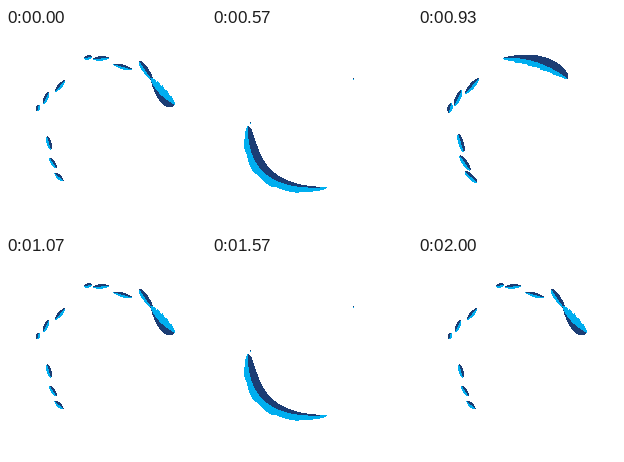
These frames come from a looping animation (200x200 px, 2070 ms). An HTML page:

```html
<!DOCTYPE html>
<html>
<head>
<meta charset="utf-8">
<style>
  html, body { margin: 0; width: 100%; height: 100%; overflow: hidden; background: #fff; }
  svg { display: block; width: 100vw; height: 100vh; shape-rendering: crispEdges; }
</style>
</head>
<body>
<svg id="stage" viewBox="0 0 200 200"></svg>
<script>
const DARK = '#1c3d74', LIGHT = '#00aeef';
const CENTER = [100, 98], STEPS = 40;

// Point and outward normal at u on a quadratic curve through tail, mid and head.
function along([tail, mid, head], u) {
  const v = 1 - u, point = [], slope = [];
  for (const i of [0, 1]) {
    const control = 2 * mid[i] - (tail[i] + head[i]) / 2;
    point[i] = v * v * tail[i] + 2 * u * v * control + u * u * head[i];
    slope[i] = v * (control - tail[i]) + u * (head[i] - control);
  }
  let [nx, ny] = [slope[1], -slope[0]];
  const outward = nx * (point[0] - CENTER[0]) + ny * (point[1] - CENTER[1]);
  const scale = Math.sign(outward) / Math.hypot(nx, ny);
  return { point, normal: [nx * scale, ny * scale] };
}

// One side of a stroke; bias moves the widest part to the head, rag notches the edge.
function side(spine, width, color, bias, rag) {
  const inner = [], edge = [];
  for (let i = 0; i <= STEPS; i++) {
    const u = i / STEPS, { point, normal } = along(spine, u);
    const swell = Math.sqrt(Math.max(0, Math.sin(Math.PI * u ** bias)));
    const w = width * swell * (1 - rag * (u * 5 % 1));
    inner.push(point);
    edge.unshift(point.map((p, k) => p + normal[k] * w));
  }
  return `<polygon points="${[...inner, ...edge].join(' ')}" fill="${color}"/>`;
}

// Positive widths grow away from the centre, negative ones towards it.
const brush = (spine, dark, light, bias = 1, rag = .25) =>
  side(spine, light, LIGHT, 1, rag) + side(spine, dark, DARK, bias, 0);

// Short strokes lying along the ring; the navy side flips in the lower half.
const dashes = (marks, width, stretch = 1) => marks.map(([x, y, length = 4]) => {
  const dx = x - CENTER[0], dy = y - CENTER[1];
  const k = length * stretch / 2 / Math.hypot(dx, dy);
  const w = y > CENTER[1] ? -width : width;
  const spine = [-k, 0, k].map(s => [x - dy * s, y + dx * s]);
  return brush(spine, w, -w, 1, 0);
}).join('');

const marks = [
  [53, 149, 12], [47, 135, 13], [43, 115, 14], [32, 80, 7], [40, 70, 13],
  [54, 58, 15], [82, 29.5, 8], [95, 30.5, 16], [117, 39, 20]
];
const ringDots = [
  [46, 141], [41.5, 124], [38.5, 101], [35.5, 72], [47, 59],
  [64, 48], [91, 28], [110, 31.5], [134, 47]
];
const rightDots = [[150, 46.5], [152, 53.5], [153.5, 61.5]];

const poses = {
  right: dashes(marks, 2.3) +
    brush([[133, 33], [139, 42], [147, 53]], 3.5, -3) +
    brush([[144, 50], [153, 65], [169, 77]], -6, 8, 3),
  rightLow: dashes(ringDots, 1.8, 2) +
    brush([[146, 48], [162, 78], [166, 116]], -8, 8, 2),
  bottomRight: dashes([...ringDots, ...rightDots], 1.6) +
    brush([[160, 106], [157, 128], [151, 149]], -8, 8, 3),
  bottom: dashes(ringDots, 1, .5) +
    brush([[152, 134], [118, 159], [63, 151]], -8, 8, 2),
  left: dashes([[141.5, 51], [38.5, 95]], .7, .4) +
    brush([[116, 159], [55, 147], [36, 97]], -8, 8, 2),
  top: brush([[42, 61], [65, 42], [106, 33]], 8, -7, 2) +
    brush([[49, 62], [36, 93], [37, 131]], 8, -7) +
    brush([[46, 124], [58, 149], [81, 168]], -5, 6),
  topRight: dashes(marks.slice(0, 6), 2.8, 1.4) +
    brush([[84, 30], [118, 34], [150, 51]], 8, -6, 2)
};

const LOOP = 2070, TURN = 1000;
const cycle = [[140, 'rightLow'], [290, 'bottomRight'], [500, 'bottom'],
  [570, 'left'], [790, 'top'], [930, 'topRight']];
const timeline = [
  [0, 'right'], ...cycle, [1070, 'right'],
  ...cycle.map(([start, pose]) => [start + TURN, pose]), [2000, 'right']
];

const stage = document.getElementById('stage');
const begin = performance.now();
let shown;
function tick() {
  const t = (performance.now() - begin) % LOOP;
  const pose = timeline.findLast(([start]) => start <= t)[1];
  if (pose !== shown) stage.innerHTML = poses[shown = pose];
  requestAnimationFrame(tick);
}
tick();
</script>
</body>
</html>
```
